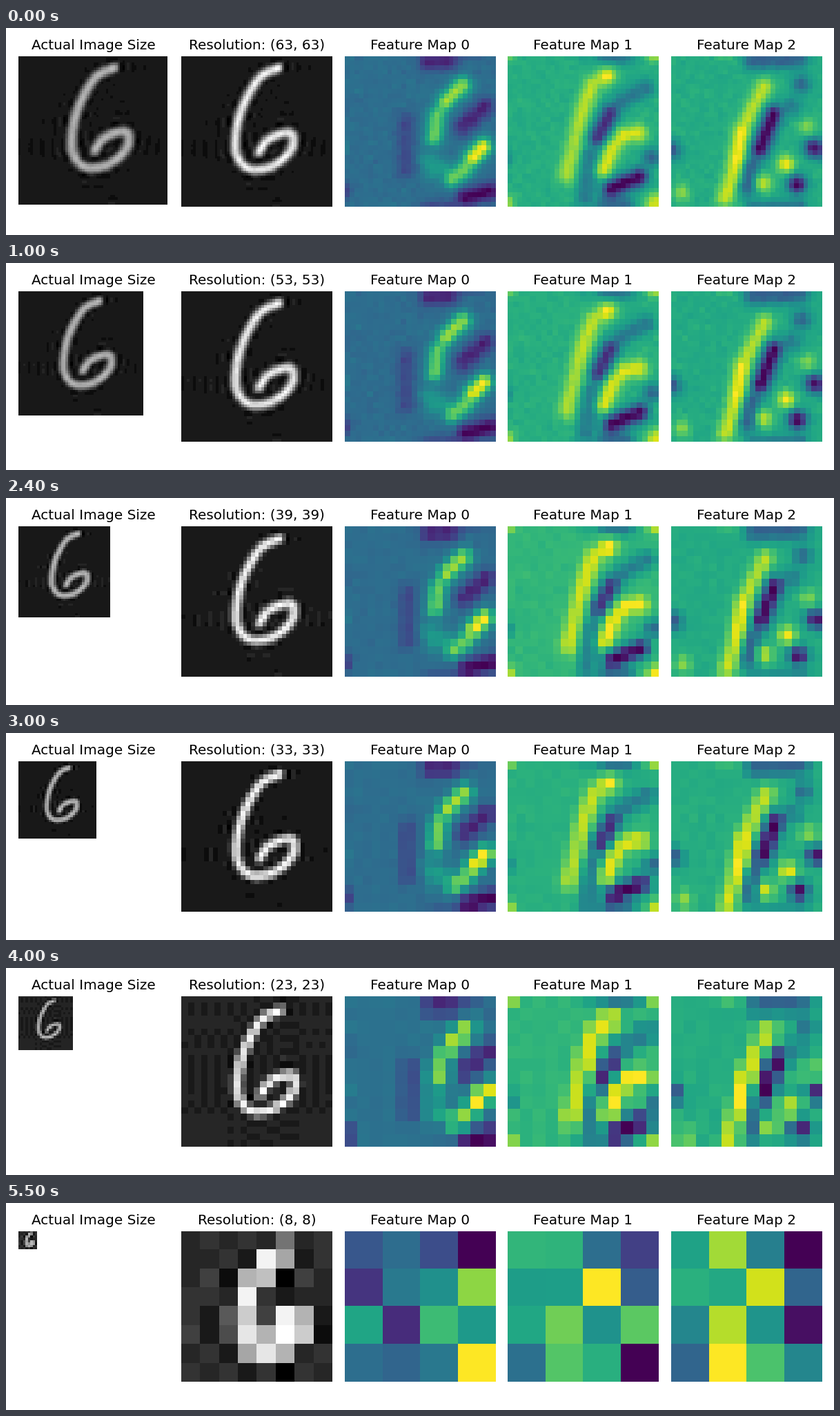
Write a matplotlib script that moves like this. It is 1200 by 300 pixels and loops after 5.6 s.

```python
import numpy as np
import matplotlib.pyplot as plt
from matplotlib.animation import FuncAnimation

W, H, DPI = 1200, 300, 120
SIDE, PAD = 218.4, 18.0          # panel side and gap in pixels
CANVAS = 64
FIRST, LAST = 63, 8              # image resolution, one step per frame
SOFT = 13                        # radius of the soft strokes

# Pen path of the digit, in panel pixels.
SIX = [(142, 20), (117, 33), (96, 65), (83, 104), (82, 144), (101, 166),
       (134, 162), (161, 138), (160, 114), (130, 122), (114, 141)]


def smooth_path(points):
    """Dense Hermite curve through the points."""
    p = np.reshape(points, (-1, 2)).astype(float)
    if len(p) == 1:
        return p
    m = np.gradient(p, axis=0)
    t = np.linspace(0, 1, 24)[:, None]
    s = t * t * (3 - 2 * t)
    parts = [a + (b - a) * s + u * t * (1 - t) ** 2 - v * t * t * (1 - t)
             for a, b, u, v in zip(p, p[1:], m, m[1:])]
    return np.concatenate(parts)


def path_distance(points, size, offset):
    """Distance of every grid node to a path on a wrapping panel."""
    axis = np.arange(size) * SIDE / size + offset
    dx, dy = ((axis[:, None] - p + SIDE / 2) % SIDE - SIDE / 2
              for p in smooth_path(points).T)
    return np.sqrt((dy[:, None] ** 2 + dx[None] ** 2).min(axis=2))


def resample(img, size):
    """Change resolution by cropping or padding the centred spectrum."""
    n = len(img)
    spec = np.fft.fftshift(np.fft.fft2(img))
    out = np.zeros((size, size), complex)
    k = min(n, size)
    a, b = n // 2 - k // 2, size // 2 - k // 2
    out[b:b + k, b:b + k] = spec[a:a + k, a:a + k]
    return np.fft.ifft2(np.fft.ifftshift(out)).real * (size / n) ** 2


def normalise(img):
    return (img - img.min()) / (img.max() - img.min())


def make_digit():
    cell = SIDE / 28
    img = np.clip(1.3 - path_distance(SIX, 28, cell / 2) / cell, 0, 1)
    img[16:19] -= 0.035 * (-1.0) ** np.arange(28)
    return img


def make_map(base, *strokes):
    """Sum of soft strokes, each an amplitude and one or two points."""
    img = base + 0.012 * resample(rng.normal(size=(28, 28)), CANVAS)
    for amp, *points in strokes:
        d = path_distance(points, CANVAS, SIDE / CANVAS)
        img += amp * np.exp(-(d / SOFT) ** 2)
    return img


rng = np.random.default_rng(6)
digit = make_digit()

arc_map = make_map(
    .31,
    (.50, 170, 43, 146, 66), (.42, 133, 88, 129, 118),
    (.15, 118, 150, 140, 160), (.12, 125, 170),
    (.65, 200, 132, 186, 146), (.42, 172, 166, 155, 178),
    (-.27, 172, 102, 202, 74), (-.14, 88, 95, 88, 165),
    (-.28, 120, 8, 150, 7), (-.36, 175, 205, 210, 196))

stem_map = make_map(
    .62,
    (.38, 143, 29), (.28, 122, 43, 107, 84), (.25, 102, 105, 85, 172),
    (.32, 190, 112, 168, 115), (.32, 152, 132, 138, 165),
    (-.50, 148, 84, 130, 118), (-.22, 120, 145, 112, 205),
    (-.22, 165, 65, 200, 47), (-.28, 140, 216, 170, 216),
    (-.62, 150, 192, 190, 176), (-.30, 208, 147), (.32, 213, 213))

spot_map = make_map(
    .62,
    (.27, 134, 45, 112, 88), (.37, 102, 110, 95, 148),
    (.30, 91, 168, 78, 205), (-.58, 148, 85, 128, 135),
    (-.30, 115, 160, 110, 190), (-.30, 118, 7, 185, 5),
    (-.28, 188, 42), (-.18, 175, 72), (-.50, 205, 133), (-.25, 2, 138),
    (.20, 196, 103), (.36, 166, 157), (.30, 132, 184),
    (-.60, 182, 186), (.20, 15, 198))

fig = plt.figure(figsize=(W / DPI, H / DPI), dpi=DPI, facecolor="white")


def panel(col, title, cmap):
    left, bottom = PAD + col * (SIDE + PAD), (H - SIDE) / 2
    ax = fig.add_axes([left / W, bottom / H, SIDE / W, SIDE / H])
    ax.axis("off")
    ax.set_title(title, fontsize=12)
    return ax.imshow(np.ones((2, 2)), cmap=cmap, vmin=0, vmax=1,
                     interpolation="nearest", aspect="auto",
                     extent=(0, 1, 1, 0))


actual = panel(0, "Actual Image Size", "gray")
scaled = panel(1, "", "gray")
maps = [(panel(2 + k, f"Feature Map {k}", "viridis"), field)
        for k, field in enumerate((arc_map, stem_map, spot_map))]


def update(i):
    n = FIRST - i
    img = np.round(normalise(resample(digit, n)) * 20) / 20
    canvas = np.ones((CANVAS, CANVAS))
    canvas[:n, :n] = img * (1 - 0.27 * img)
    actual.set_data(canvas)
    scaled.set_data(img)
    scaled.axes.set_title(f"Resolution: ({n}, {n})", fontsize=12)
    for im, field in maps:
        im.set_data(normalise(resample(field, (n + 1) // 2)))
    return [actual, scaled]


anim = FuncAnimation(fig, update, frames=FIRST - LAST + 1, interval=100,
                     repeat=True, repeat_delay=0, blit=False)
plt.show()
```
